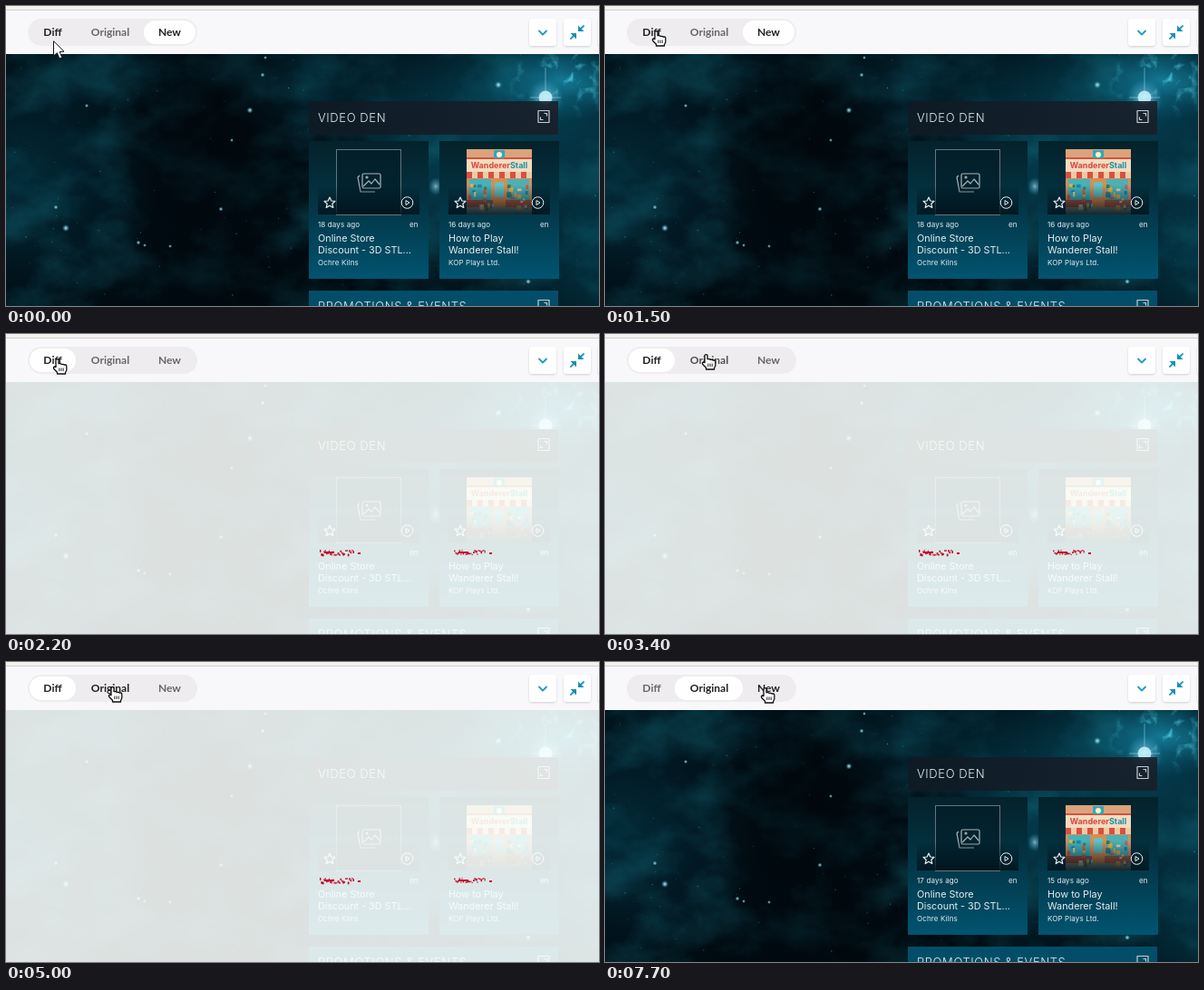
An HTML page that plays this animation: 654x331 px, repeating every 8000 ms.

```html
<!DOCTYPE html>
<html lang="en">
<head>
<meta charset="utf-8">
<title>Page comparison</title>
<style>
  html, body { margin: 0; width: 100%; height: 100%; overflow: hidden; background: #f8f8fa; }
  svg { display: block; width: 100vw; height: 100vh; }
  text { font-family: Inter, "Open Sans", sans-serif; fill: #e4eef2; }
  .tab { font: 700 12px Lato, "Open Sans", sans-serif; text-anchor: middle; }
  .heading { font-size: 13px; font-weight: 300; letter-spacing: .6px; }
  .title { font-size: 10.8px; }
  .small { font-size: 8px; letter-spacing: .12px; }
  .line { fill: none; stroke: #e6eef0; stroke-width: 1.2; stroke-linejoin: round; }
  .icon { fill: none; stroke: #1f9cc0; stroke-width: 1.8; stroke-linecap: round; stroke-linejoin: round; }
</style>
</head>
<body>
<svg viewBox="0 0 654 331">
  <defs>
    <radialGradient id="teal"><stop stop-color="#05495d"/><stop offset="1" stop-color="#05495d" stop-opacity="0"/></radialGradient>
    <radialGradient id="cyan"><stop stop-color="#1fa9d2"/><stop offset="1" stop-color="#0f86aa" stop-opacity="0"/></radialGradient>
    <radialGradient id="white"><stop stop-color="#fff"/><stop offset=".25" stop-color="#a8eaff" stop-opacity=".7"/><stop offset="1" stop-color="#4cc6ea" stop-opacity="0"/></radialGradient>
    <radialGradient id="dark"><stop stop-color="#01060b"/><stop offset="1" stop-color="#01060b" stop-opacity="0"/></radialGradient>
    <linearGradient id="card" x2="0" y2="1"><stop stop-color="#04222b"/><stop offset=".45" stop-color="#033444"/><stop offset="1" stop-color="#015470"/></linearGradient>
    <linearGradient id="shade" x2="0" y2="1"><stop offset=".55" stop-color="#02121a" stop-opacity="0"/><stop offset="1" stop-color="#02121a" stop-opacity=".85"/></linearGradient>
    <linearGradient id="bar"><stop stop-color="#0e1a24"/><stop offset="1" stop-color="#191f2a"/></linearGradient>
    <filter id="cloud" x="0" y="0" width="1" height="1">
      <feTurbulence type="fractalNoise" baseFrequency=".014 .019" numOctaves="5" seed="11"/>
      <feColorMatrix values="0 0 0 0 .01  0 0 0 0 .24  0 0 0 0 .31  2.4 0 0 0 -.95"/>
    </filter>
    <filter id="wisps" x="0" y="0" width="1" height="1">
      <feTurbulence type="turbulence" baseFrequency=".03" numOctaves="4" seed="5"/>
      <feColorMatrix values="0 0 0 0 .1  0 0 0 0 .72  0 0 0 0 .9  -4.5 0 0 0 1.1"/>
    </filter>
    <mask id="corner"><ellipse cx="620" cy="78" rx="80" ry="48" fill="url(#white)"/></mask>
    <filter id="shadow" x="-.3" y="-.3" width="1.6" height="1.6"><feDropShadow dx="0" dy="1" stdDeviation="1.2" flood-opacity=".16"/></filter>
    <clipPath id="page"><path d="M0 53H654V331H0Z"/></clipPath>
    <g id="expand" class="line">
      <path d="M1 .5H13V13.500H1ZM7.500 3.500H10.500V6.500M6.500 10.500H3.500V7.500" stroke="#c3ccd1"/>
    </g>
    <g id="tools" class="line">
      <path d="M0-6 1.8-2 6-1.700 2.800 1.300 3.800 5.500 0 3.200-3.800 5.500-2.800 1.300-6-1.700-1.800-2Z"/>
      <circle cx="85.500" r="6.300" stroke-width="1"/><path d="M84-2.500 88 0 84 2.500Z" stroke-width="1"/>
    </g>
  </defs>

  <g clip-path="url(#page)">
    <rect y="53" width="654" height="278" fill="#010b12"/>
    <g id="sky"></g>
    <path fill="url(#bar)" fill-opacity=".9" d="M334 105H609V142H334Z"/>
    <text class="heading" x="344" y="128">VIDEO DEN</text>
    <use href="#expand" x="586" y="115"/>
    <g id="cards"></g>
    <path fill="#024e68" d="M334 314H609V331H334Z"/>
    <text class="heading" x="344" y="336">PROMOTIONS &amp; EVENTS</text>
    <use href="#expand" x="586" y="324"/>
    <path id="veil" d="M0 53H654V331H0Z" fill="#fbfffd" fill-opacity=".88"/>
    <g id="marks"></g>
  </g>

  <path fill="#f8f8fa" d="M0 0H654V53H0Z"/>
  <path fill="#f3f1ef" d="M0 0H654V4H0Z"/>
  <path fill="#d6d3ce" d="M0 4H654V5H0Z"/>
  <rect x="24" y="14" width="187" height="30" rx="15" fill="#eeecef"/>
  <rect id="pill" y="16" height="26" rx="13" fill="#fff"/>
  <text class="tab" x="51.500" y="33">Diff</text>
  <text class="tab" x="115" y="33">Original</text>
  <text class="tab" x="180.500" y="33">New</text>
  <g fill="#fff" filter="url(#shadow)">
    <rect x="577" y="14" width="30" height="30" rx="4"/>
    <rect x="615" y="14" width="30" height="30" rx="4"/>
    <rect x="653" y="14" width="30" height="30" rx="4"/>
  </g>
  <path class="icon" d="M588 27.500 592 31.500 596 27.500"/>
  <path class="icon" d="M637 22 633 26M623 36 627 32"/>
  <path fill="#168fb5" d="M631 21.500V28H637.500ZM629 36.500V30H622.500Z"/>

  <g id="arrow" stroke="#111" stroke-linejoin="round" fill="#fff">
    <path d="M.5.800V17L4.300 13.600 7 20 9.800 18.800 7.200 12.600 12 12.200Z"/>
  </g>
  <g id="hand" stroke="#111" stroke-width="1.300" stroke-linejoin="round" fill="#fff">
    <path d="M3 9.500V2Q3 .7 4.500.7T6 2V5.700H8.200L9 6.300H11L12 7H13.500Q14.800 7 14.800 8.500V13L13.500 15.500V17H4.500V15.300L.8 11.500Q0 9.500 1.200 9Z"/>
    <path stroke-width=".9" d="M6.800 10.500v3.500M9 10.500v3.500M11.200 10.500v3.500"/>
  </g>
</svg>
<script>
  const $ = id => document.getElementById(id);

  function randomFrom(seed) {
    return () => (seed = (seed * 16807) % 2147483647) / 2147483647;
  }

  const glow = (paint, x, y, rx, ry = rx, opacity = 1) =>
    `<ellipse cx="${x}" cy="${y}" rx="${rx}" ry="${ry}" fill="url(#${paint})" opacity="${opacity}"/>`;
  const rect = (x, y, w, h, fill) =>
    `<rect x="${x}" y="${y}" width="${w}" height="${h}" fill="${fill}"/>`;

  function drawSky() {
    const random = randomFrom(73);
    let out = glow('teal', 20, 190, 150, 150, .5) + glow('teal', 110, 60, 130, 60, .3)
      + glow('teal', 350, 80, 120, 80, .4) + glow('teal', 580, 110, 210, 140, .9)
      + glow('teal', 650, 260, 130, 160, .7) + glow('teal', 470, 200, 110, 140, .7)
      + '<rect y="53" width="654" height="278" filter="url(#cloud)" opacity=".28"/>'
      + glow('dark', 225, 160, 110, 170, .7) + glow('dark', 250, 310, 150, 80, .5)
      + glow('cyan', 612, 82, 85, 45, .5)
      + '<g mask="url(#corner)"><rect x="530" y="53" width="124" height="90" filter="url(#wisps)"/></g>'
      + glow('white', 595, 101, 20, 20, .6) + '<circle cx="595" cy="101" r="7.500" fill="#c9f3ff" opacity=".85"/>'
      + glow('white', 474, 199, 8, 10, .6)
      + '<path d="M595 68V106M578 101H612" stroke="#b9f1ff" stroke-opacity=".45"/>';
    for (let i = 0; i < 130; i++) {
      out += `<circle cx="${random() * 654}" cy="${53 + random() * 278}" r="${.3 + random() * .4}" fill="#79c6d8" opacity="${.15 + random() * .5}"/>`;
    }
    const stars = [[66, 245, 4], [269, 115, 3.5], [283, 76, 2.5], [237, 224, 2.5],
      [146, 261, 2.5], [153, 264, 2], [89, 110, 2.2], [181, 265, 2], [249, 148, 2],
      [543, 87, 4], [576, 304, 3], [55, 222, 2.5], [286, 57, 2]];
    for (const [x, y, r] of stars) out += glow('white', x, y, r);
    $('sky').innerHTML = out;
  }

  const gallery = `<rect x="364.500" y="158.500" width="71" height="72" fill="#031c25" fill-opacity=".6" stroke="#61757c"/>
    <g class="line" stroke-width="1.700" style="stroke:#a9b4b8">
      <path d="M390 187 388 189 391 205 407 205"/><rect x="393" y="185" width="20" height="16" rx="1.500"/>
      <path d="M394 199 400 193 403 196 407 191 412 197"/><circle cx="398" cy="189" r="1"/>
    </g>`;

  function shopFront() {
    const random = randomFrom(19);
    let out = rect(508, 158, 72, 72, '#c9906a') + rect(508, 158, 72, 10, '#d9a47c')
      + rect(508, 168, 72, 15, '#f1dcc0') + rect(508, 167, 72, 2, '#d9503f')
      + rect(538, 159, 12, 9, '#3aa5b5') + '<circle cx="544" cy="164" r="3" fill="#fff0c8"/>';
    for (let i = 0; i < 12; i++) out += rect(508 + i * 6, 183, 6, 7, i % 2 ? '#f0c9a4' : '#d9503f');
    out += rect(511, 191, 24, 24, '#45b3b8') + rect(553, 191, 24, 24, '#4fb0b3')
      + rect(537, 191, 14, 32, '#e08a48') + rect(539, 194, 10, 17, '#62c0c0')
      + rect(508, 222, 72, 8, '#8d9c92') + rect(508, 214, 29, 8, '#b0503c') + rect(551, 214, 29, 8, '#bb5a43');
    const paints = ['#e8503e', '#e6b04a', '#2780a4', '#eed3ae', '#47763f'];
    for (let i = 0; i < 34; i++) {
      const side = i % 2 ? 552 : 510;
      out += rect(side + random() * 23, 196 + random() * 25, 2 + random() * 3, 2 + random() * 4, paints[i % 5]);
    }
    return out + `<text x="544" y="179" text-anchor="middle" style="font-size:9px;font-weight:700;fill:#d8453a"
      >Wanderer<tspan fill="#1d8fa6">Stall</tspan></text>`;
  }

  const card = (x, art, lines, maker) => `
    ${rect(x, 149, 132, 152, 'url(#card)')}
    ${art}
    ${rect(x + 10, 158, 112, 72, 'url(#shade)')}
    <use href="#tools" x="${x + 23}" y="217"/>
    <text class="small age" x="${x + 10}" y="244"></text>
    <text class="small" x="${x + 111}" y="244">en</text>
    <text class="title" x="${x + 10}" y="260">${lines[0]}</text>
    <text class="title" x="${x + 10}" y="273">${lines[1]}</text>
    <text class="small" x="${x + 10}" y="286">${maker}</text>`;

  function drawMarks() {
    const random = randomFrom(41);
    let out = '';
    for (const [x, width] of [[346, 37], [494, 34]]) {
      for (let i = 0; i < width; i += 1.4) {
        const y = 238 + random() * 5;
        out += rect(x + i, y, 1 + random(), 1 + random() * 2, '#c20d2c');
      }
      out += rect(x + 5, 240, 11, 2, '#c20d2c') + rect(x + width + 5, 241, 3, 2, '#c20d2c');
    }
    $('marks').innerHTML = out;
  }

  drawSky();
  drawMarks();
  $('cards').innerHTML =
    card(334, gallery, ['Online Store', 'Discount - 3D STL...'], 'Ochre Kilns')
    + card(478, shopFront(), ['How to Play', 'Wanderer Stall!'], 'KOP Plays Ltd.');

  // Each step lists only what changes; ink is the darkness of the three tab labels.
  const steps = [
    [0, { x: 52, y: 38, hand: false, view: 'new', tab: 2, scale: 1, marks: false, ink: [1, 0, 1] }],
    [200, { x: 118, y: 36, hand: true, ink: [.3, .5, 1] }],
    [600, { x: 108, y: 37, ink: [0, .6, 1] }],
    [700, { x: 82, y: 35 }],
    [800, { x: 46, y: 31, ink: [.3, .5, 1] }],
    [900, { x: 20, y: 26, ink: [.7, .3, 1] }],
    [1000, { x: 14, y: 24, ink: [1, .2, 1] }],
    [1100, { x: 49, y: 28, ink: [1, .1, 1] }],
    [1500, { x: 52, y: 27, ink: [1, 0, 1] }],
    [1900, { view: 'diff' }],
    [2000, { tab: 0, scale: .95, marks: true, ink: [1, 0, .6] }],
    [2100, { scale: .98, ink: [1, 0, .2] }],
    [2200, { scale: 1, ink: [1, 0, 0] }],
    [3400, { x: 107, y: 22, ink: [1, .35, 0] }],
    [3500, { x: 122, y: 20, ink: [1, .7, 0] }],
    [3600, { x: 137, y: 18, ink: [1, 1, 0] }],
    [3700, { x: 151, y: 19, ink: [1, .8, 0] }],
    [3800, { x: 163, y: 21, ink: [1, .6, .1] }],
    [3900, { x: 171, y: 24, ink: [1, .5, .3] }],
    [4000, { x: 175, y: 26, ink: [1, .4, .5] }],
    [4100, { x: 177, y: 27, ink: [1, .3, .7] }],
    [4200, { x: 178, y: 28, ink: [1, .15, .85] }],
    [4300, { ink: [1, 0, 1] }],
    [4500, { x: 164, y: 22, ink: [1, .1, .9] }],
    [4600, { x: 138, y: 18, ink: [1, .4, .6] }],
    [4700, { x: 119, y: 24, ink: [1, .7, .3] }],
    [4800, { x: 113, y: 27, ink: [1, .9, .1] }],
    [5000, { ink: [1, 1, 0] }],
    [6900, { view: 'original', tab: 1, scale: .96, marks: false, ink: [.15, 1, 0] }],
    [7000, { scale: 1, ink: [.05, 1, 0] }],
    [7200, { x: 158, y: 27, ink: [0, 1, .3] }],
    [7300, { x: 190, y: 28, ink: [0, 1, .7] }],
    [7500, { ink: [0, 1, .9] }],
    [7700, { x: 172, y: 28, ink: [0, 1, 1] }]
  ];
  let state = {};
  const states = steps.map(([at, change]) => (state = { ...state, ...change, at }));

  const tabs = [[26, 51], [77, 75], [152, 57]];
  const labels = [...document.querySelectorAll('.tab')];
  const ages = [...document.querySelectorAll('.age')];
  const show = (id, on) => { $(id).style.display = on ? '' : 'none'; };

  function render(s) {
    show('veil', s.view === 'diff');
    show('marks', s.marks);
    show('arrow', !s.hand);
    show('hand', s.hand);
    $(s.hand ? 'hand' : 'arrow').setAttribute('transform', `translate(${s.x} ${s.y})`);
    const [left, width] = tabs[s.tab];
    const inset = width * (1 - s.scale) / 2;
    $('pill').setAttribute('x', left + inset);
    $('pill').setAttribute('width', width * s.scale);
    labels.forEach((label, i) => {
      const level = Math.round(104 - 70 * s.ink[i]);
      label.style.fill = `rgb(${level},${level},${level})`;
    });
    const days = s.view === 'original' ? [17, 15] : [18, 16];
    ages.forEach((age, i) => { age.textContent = s.marks ? '' : `${days[i]} days ago`; });
  }

  const start = performance.now();
  let current;
  function tick() {
    const t = (performance.now() - start) % 8000;
    const next = states.findLast(s => s.at <= t);
    if (next !== current) render(current = next);
    requestAnimationFrame(tick);
  }
  tick();
</script>
</body>
</html>
```
